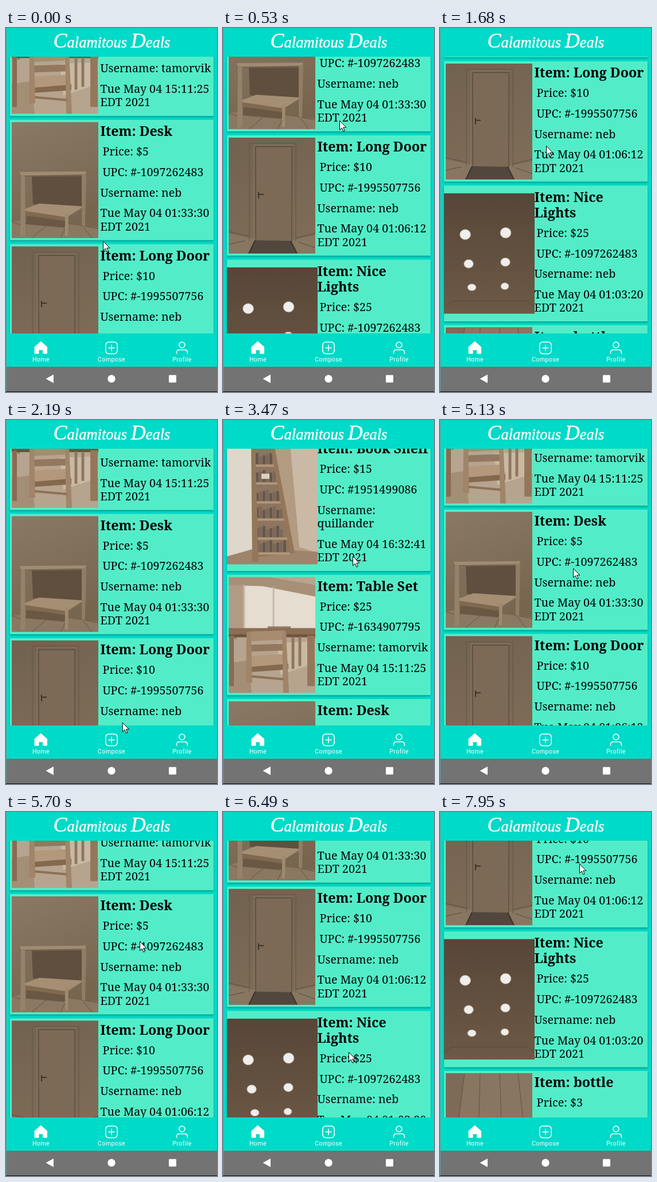
Animation of 368 by 634 pixels, one loop 8 s. Source, as an HTML page:

```html
<!DOCTYPE html>
<html lang="en">
<head>
<meta charset="utf-8">
<title>Calamitous Deals</title>
<style>
  html, body { margin: 0; width: 100%; height: 100%; overflow: hidden; background: #00dac8; }
  svg { display: block; width: 368px; height: 634px; }
  .row { font: 19.7px "Noto Serif", serif; }
  .title { font: bold 23.3px "Noto Serif", serif; }
  .brand { font: italic 26.5px "Liberation Serif", serif; fill: #fff; stroke: #fff; stroke-width: .5; text-anchor: middle; }
  .brand tspan { font-size: 36px; }
  .tab { font: 10.7px Roboto, sans-serif; letter-spacing: .36px; fill: #fff; text-anchor: middle; }
  .icon { fill: none; stroke: #fff; stroke-width: 1.6; stroke-linecap: round; stroke-linejoin: round; }
  .card { fill: #52edc8; filter: drop-shadow(0 2px 1.5px rgba(0, 70, 60, .4)); }
</style>
</head>
<body>
<svg viewBox="0 0 368 634">
  <defs>
    <clipPath id="view"><rect y="50" width="368" height="482"/></clipPath>
    <clipPath id="small"><rect width="151" height="202"/></clipPath>
    <clipPath id="large"><rect width="158" height="210"/></clipPath>
    <linearGradient id="wall" x2=".3" y2="1"><stop stop-color="#8a7965"/><stop offset="1" stop-color="#77654f"/></linearGradient>
    <linearGradient id="dim" x2=".3" y2="1"><stop stop-color="#716250"/><stop offset="1" stop-color="#7e6c57"/></linearGradient>
    <linearGradient id="ceiling" x2="0" y2="1"><stop stop-color="#574638"/><stop offset="1" stop-color="#6d5946"/></linearGradient>
  </defs>
  <rect width="368" height="634" fill="#00dac8"/>
  <g clip-path="url(#view)"><g id="list"></g></g>

  <text class="brand" x="184.5" y="34"><tspan>C</tspan>alamitous <tspan>D</tspan>eals</text>

  <path d="M60.700 546L50 555.500V567H57V560.500H64.500V567H71.500V555.500Z" fill="#fff" stroke="#fff" stroke-linejoin="round"/>
  <g class="icon">
    <rect x="173.800" y="547" width="20.400" height="20.400" rx="5.500"/>
    <path d="M184 552.200V562.200M179 557.200H189"/>
    <circle cx="307" cy="552" r="5"/>
    <path d="M297.500 567.300V565.500Q297.500 560.500 302.500 560.500H311.500Q316.500 560.500 316.500 565.500V567.300"/>
  </g>
  <text class="tab" x="61" y="581">Home</text>
  <text class="tab" x="184" y="581">Compose</text>
  <text class="tab" x="307" y="581">Profile</text>

  <rect y="590" width="368" height="44" fill="#737373"/>
  <path d="M69.500 611L83 603.500V618.500Z" fill="#fff"/>
  <circle cx="184" cy="611" r="6.700" fill="#fff"/>
  <rect x="284" y="604.500" width="13" height="13" rx="1" fill="#fff"/>
  <path d="M.5 0V634" stroke="#5d9f99"/>
  <path d="M0 633.500H368" stroke="#111"/>
  <path id="cursor" d="M.5 .5V16.500L4.200 13.100L6.900 19L9.300 18L6.700 12.200H11.800Z" fill="#fff" stroke="#000" stroke-width="1"/>
</svg>
<script>
const rect = (x, y, w, h, fill) => `<rect x="${x}" y="${y}" width="${w}" height="${h}" fill="${fill}"/>`;
const poly = (fill, points) => `<polygon points="${points}" fill="${fill}"/>`;
const line = (d, stroke, width = 1) => `<path d="${d}" fill="none" stroke="${stroke}" stroke-width="${width}"/>`;
const spot = (x, y, rx, ry) => `<ellipse cx="${x}" cy="${y}" rx="${rx}" ry="${ry}" fill="#efeeec" stroke="#a8977f"/>`;

const pictures = {
  plain: () => rect(0, 0, 151, 202, 'url(#wall)'),

  shelf() {
    let art = rect(0, 0, 158, 210, '#b39b82') + rect(0, 0, 44, 196, '#ded7cc')
      + poly('#c9b9a5', '110,0 158,0 158,190 126,180') + poly('#9d846b', '0,196 50,182 158,188 158,210 0,210')
      + poly('#8d755f', '45,0 80,0 114,190 47,198');
    [[36, 0], [67, 5], [100, 10], [130, 15], [163, 20], [189, 25]].forEach(([y, grow], i) => {
      const right = 84 + grow;
      for (let x = 50; x < right - 6; x += 6) {
        const tall = 14 + (x * 7 + i * 5) % 8;
        art += rect(x, y - tall, 5, tall, x % 4 ? '#65574b' : '#7b6859');
      }
      art += rect(46, y, right - 44, 4, '#b3967a');
    });
    return art + poly('#94775a', '42,0 49,0 55,205 44,205') + poly('#94775a', '75,0 82,0 118,190 110,192')
      + rect(60, 52, 14, 9, '#ddd2c4');
  },

  dining() {
    return rect(0, 0, 151, 202, '#b7a48f') + rect(26, 15, 125, 76, '#e4ddd0')
      + poly('#a78f78', '0,0 70,0 151,14 151,34 60,16 0,14') + rect(0, 14, 27, 80, '#b29b84')
      + line('M78 18V90M27 14V92', '#c8b9a6', 3)
      + poly('#c9b9a3', '84,115 151,112 151,150 90,170') + poly('#a58e76', '0,150 35,145 40,202 0,202')
      + line('M70 100V88H106V100M12 108V92H36', '#947a60', 4)
      + rect(0, 89, 151, 12, '#8b6e53') + rect(0, 100, 151, 5, '#6b533f')
      + rect(1, 102, 8, 88, '#876b52') + rect(137, 102, 13, 88, '#94775b')
      + line('M112 104V160M124 104V155', '#917760', 5)
      + poly('#a88c70', '35,95 97,93 99,109 34,112') + poly('#93785f', '38,118 96,116 96,128 37,130')
      + poly('#b4987b', '39,137 97,134 104,151 31,157') + poly('#85694f', '31,157 104,151 104,161 31,166')
      + poly('#a0856a', '31,96 39,96 41,184 30,184') + poly('#a0856a', '93,94 100,94 105,202 95,202')
      + line('M40 173L96 178', '#8c7158', 4);
  },

  desk() {
    return rect(0, 0, 151, 202, 'url(#wall)') + poly('#8b7862', '0,174 24,170 151,184 151,202 0,202')
      + line('M0 174L18 180M120 180L151 186M60 181L35 202M95 182L85 202M125 183L140 202', '#665440')
      + poly('#604f3e', '35,95 122,94 122,148 37,143') + poly('#6a5845', '26,164 96,169 92,184 24,178')
      + poly('#a48f75', '16,154 48,142 126,147 96,166') + poly('#80694f', '16,154 96,166 96,173 16,161')
      + poly('#a08b73', '14,87 130,86 128,92 16,94') + line('M14 94L130 92', '#665440')
      + poly('#96816a', '16,92 23,92 24,198 15,200') + poly('#917c65', '122,91 130,91 128,182 122,180')
      + poly('#9f8a70', '93,160 99,158 98,198 93,198');
  },

  door() {
    return rect(0, 0, 151, 202, 'url(#dim)') + poly('#877660', '0,167 36,175 116,178 151,170 151,202 0,202')
      + line('M0 164L36 172M117 175L151 167M0 186L28 180M122 182L151 192', '#5b4d3e')
      + rect(47, 16, 63, 165, '#7c6a56') + line('M36 180V10H117V181', '#645543')
      + line('M47 180V16H110V181', '#4c4034') + line('M44 180V13H113', '#8a7862')
      + poly('#51473d', '46,179 108,180 119,202 35,202') + line('M46 179L35 202M108 180L119 202', '#3c332b', 2)
      + line('M52 95V106M51 99H61', '#3d332a', 2);
  },

  lights() {
    return rect(0, 0, 158, 210, 'url(#ceiling)') + line('M0 198L12 188H146L158 198', '#594737')
      + spot(37, 72, 9.500, 9) + spot(107.500, 69, 9.500, 9.300) + spot(43, 123, 8.300, 7.500)
      + spot(107, 120, 8.300, 7.500) + spot(48.500, 164, 7.500, 6) + spot(106, 162, 7, 6);
  },

  bottle() {
    return rect(0, 0, 151, 202, '#7d6b57') + poly('#897660', '33,0 151,0 151,202 10,202')
      + line('M33 0L18 110M60 0L57 110M94 0L98 110M126 0L138 110', '#655441');
  }
};

const text = (cls, x, y, value) => `<text class="${cls}" x="${x}" y="${y}">${value}</text>`;

// Text rows run down from the card top; extra lines push the rest down.
function card({ top, height = 209.5, art, large, title, price, upc, user, time }) {
  const [w, h, x] = large ? [158, 210, 7] : [151, 202, 10];
  let out = rect(7, 0, 355, height, '').replace('<rect', '<rect class="card"').replace(' fill=""', '');
  out += `<g transform="translate(${x} ${(height - h) / 2})" clip-path="url(#${large ? 'large' : 'small'})">${pictures[art]()}</g>`;
  let y = 28;
  title.forEach((t, i) => out += text('title', 164.500, y + i * 27.300, t));
  y += (title.length - 1) * 27.300 + 34;
  for (const value of [`Price: $${price}`, `UPC: #${upc}`]) {
    out += text('row', 168.500, y, value);
    y += 35.800;
  }
  for (const block of [user, [`Tue May 04 ${time}`, 'EDT 2021']]) {
    block.forEach((t, i) => out += text('row', 164.500, y + i * 23.100, t));
    y += 35.800 + (block.length - 1) * 23.100;
  }
  return `<g transform="translate(0 ${top})">${out}</g>`;
}

const neb = ['Username: neb'];
list.innerHTML = [
  { top: -672.500, art: 'plain', title: ['Item: Lamp'], price: 10, upc: '1951499086', user: neb, time: '16:40:12' },
  { top: -456, height: 233, art: 'shelf', large: true, title: ['Item: Book Shelf'], price: 15, upc: '1951499086', user: ['Username:', 'quillander'], time: '16:32:41' },
  { top: -216.300, art: 'dining', title: ['Item: Table Set'], price: 25, upc: '-1634907795', user: ['Username: tamorvik'], time: '15:11:25' },
  { top: 0, art: 'desk', title: ['Item: Desk'], price: 5, upc: '-1097262483', user: neb, time: '01:33:30' },
  { top: 216.500, art: 'door', title: ['Item: Long Door'], price: 10, upc: '-1995507756', user: neb, time: '01:06:12' },
  { top: 433, height: 236.500, art: 'lights', large: true, title: ['Item: Nice', 'Lights'], price: 25, upc: '-1097262483', user: neb, time: '01:03:20' },
  { top: 676, art: 'bottle', title: ['Item: bottle'], price: 3, upc: '-1097262483', user: neb, time: '01:01:14' }
].map(card).join('');

// The screen refreshes in bursts: [first, last, count].
const ticks = [0];
for (const [first, last, count] of [
  [140, 530, 4], [680, 1080, 4], [1230, 1380, 2], [1680, 1680, 1], [1800, 2620, 7],
  [2770, 2770, 1], [3040, 3040, 1], [3470, 3470, 1], [3590, 4420, 7], [4710, 5130, 4],
  [5580, 6490, 8], [6800, 7250, 4], [7680, 7950, 3]
]) for (let i = 0; i < count; i++) ticks.push(first + (count > 1 ? (last - first) * i / (count - 1) : 0));

// [time, y, fling]: a fling slows down towards its key.
const scroll = [
  [0, 160], [140, 154], [530, -29.500], [680, -104], [1080, -164, 1], [1380, -164],
  [1680, -158.500], [2080, 169], [2620, 559, 1], [3040, 559],
  [3470, 486], [3730, 257], [4420, 156, 1], [5130, 156],
  [5580, 143], [5970, -57], [6490, -86.500, 1], [7250, -86.500], [7680, -109.500], [7950, -225]
];
const pointer = [
  [0, 169, 371], [140, 172, 350], [530, 203, 161], [680, 211, 88], [1080, 211, 88], [1380, 192, 179],
  [1680, 185, 205], [2080, 203, 532], [2620, 222, 315], [2770, 217, 303], [3040, 222, 330],
  [3470, 226, 237], [3730, 231, 8], [4420, 234, 382], [4710, 233, 350], [5130, 232, 258],
  [5580, 233, 225], [5970, 243, 25], [6490, 219, 418], [6800, 220, 390], [7250, 224, 248],
  [7680, 229, 205], [7950, 243, 90]
];

function segment(keys, t) {
  const i = Math.max(1, keys.findIndex(key => key[0] >= t));
  const [a, b] = [keys[i - 1], keys[i]];
  return { a, b, p: (t - a[0]) / (b[0] - a[0]) };
}
const mix = ({ a, b, p }, k) => a[k] + (b[k] - a[k]) * p;

function draw(now) {
  const clock = now % 8000;
  const t = ticks.findLast(tick => tick <= clock);
  const s = segment(scroll, t);
  if (s.b[2]) s.p = 1 - (1 - s.p) ** 2;
  const c = segment(pointer, t);
  list.setAttribute('transform', `translate(0 ${mix(s, 1)})`);
  cursor.setAttribute('transform', `translate(${mix(c, 1)} ${mix(c, 2)})`);
}

const start = performance.now();
function loop() {
  draw(performance.now() - start);
  requestAnimationFrame(loop);
}
loop();
</script>
</body>
</html>
```
